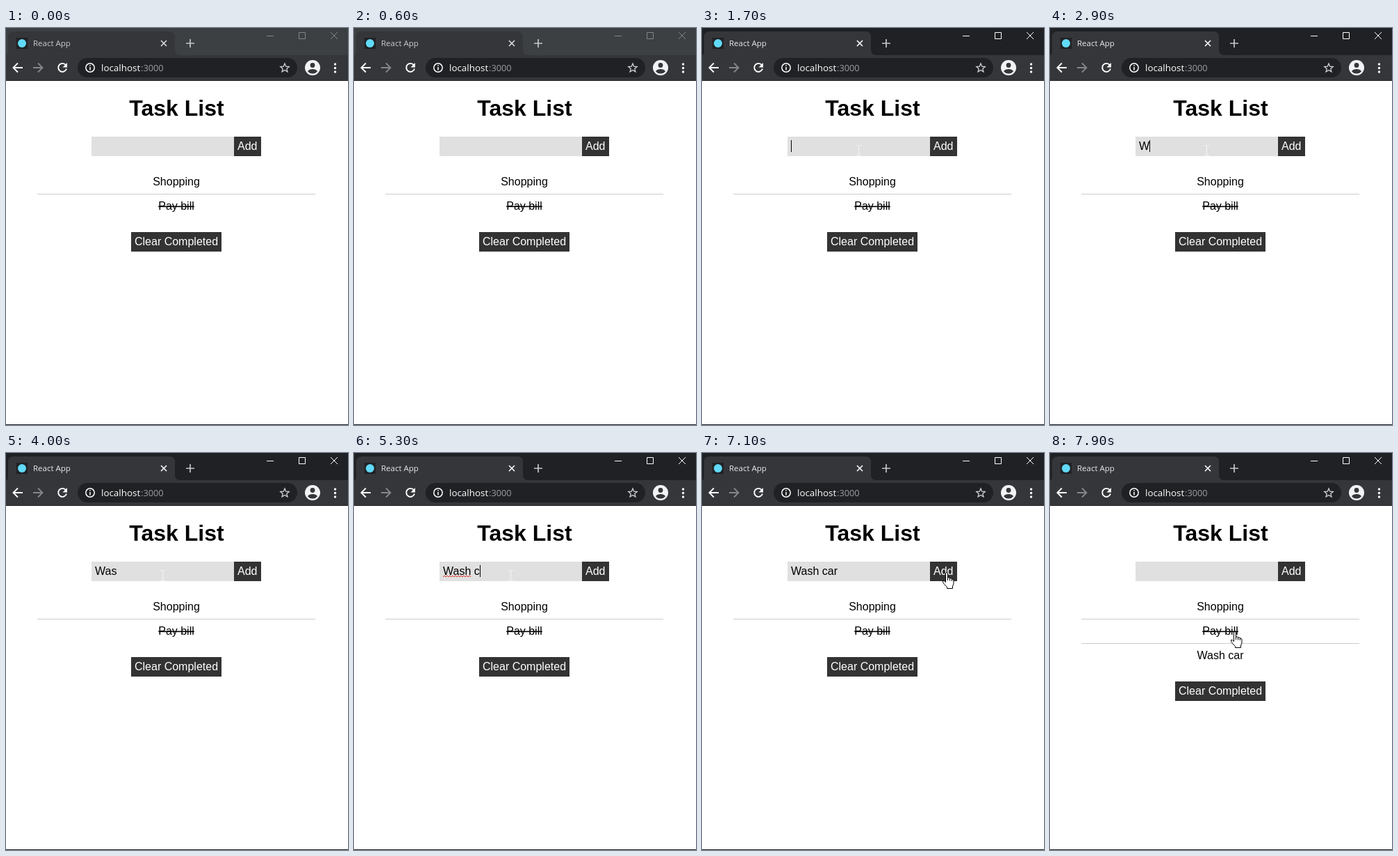
Recreate the animation shown at these times as an HTML page. Size 492x570 px, loop 8000 ms.

```html
<!DOCTYPE html>
<html lang="en">
<head>
<meta charset="utf-8">
<title>Task List</title>
<style>
html, body { margin: 0; width: 100%; height: 100%; overflow: hidden; background: #fff; }
svg { display: block; width: 492px; height: 570px; }
text { font: 16px "Liberation Sans", Arial, sans-serif; white-space: pre; }
.mid { text-anchor: middle; }
.ui { font-family: "Open Sans", "Noto Sans", sans-serif; }
.line { fill: none; stroke-width: 1; }
.icon { fill: none; stroke: #fff; stroke-width: 1.9; }
</style>
</head>
<body>
<svg viewBox="0 0 492 570">
  <rect id="strip" width="492" height="40"/>
  <path fill="#35363a" d="M0 39Q3 39 3 34V13Q3 5 11 5H235Q243 5 243 13V31Q243 39 251 39H492V76H0Z"/>
  <path class="line" stroke="#292a2d" d="M0 75.5H492"/>
  <rect x="15" y="14" width="16" height="16" fill="#202124"/>
  <circle cx="23" cy="22" r="6" fill="#61dafb"/>
  <g id="tab">
    <text class="ui" x="39" y="26" style="font-size:11.5px" fill="#e8eaed">React App</text>
    <path class="icon" style="stroke-width:1.6" d="M223 18L231 26M231 18L223 26"/>
  </g>
  <path class="icon" style="stroke:#c4c6c9;stroke-width:1.7" d="M259 22H271M265 16V28"/>
  <path id="controls" class="line" d="M375 11.5H385M421.5 6.5H430.5V15.5H421.5ZM467 6L477 16M477 6L467 16"/>

  <path class="icon" d="M24 57H11M17 50.5L10.5 57L17 63.5"/>
  <path class="icon" style="stroke:#85868a" d="M39 57H52M46 50.5L52.5 57L46 63.5"/>
  <path class="icon" d="M86 53.2A6 6 0 1 0 87 58.5"/>
  <path fill="#fff" d="M88 50V56.5H81.5Z"/>
  <rect x="103" y="43" width="316" height="28" rx="14" fill="#202124"/>
  <circle class="icon" style="stroke-width:1.5" cx="121" cy="57" r="6.2"/>
  <path class="icon" style="stroke-width:1.5" d="M121 53V54.6M121 56V60.6"/>
  <text class="ui" x="137" y="62" style="font-size:13.4px" fill="#fff">localhost</text>
  <text class="ui" x="194" y="62" style="font-size:12.8px" fill="#9aa0a6">:3000</text>
  <path class="icon" style="stroke:#d0d2d5;stroke-width:1.3" d="M401 51L402.7 55.2L407.2 55.5L403.8 58.4L404.9 62.8L401 60.4L397.1 62.8L398.2 58.4L394.8 55.5L399.3 55.2Z"/>
  <circle cx="441" cy="57" r="11" fill="#f1f3f4"/>
  <circle cx="441" cy="53.5" r="3.4" fill="#35363a"/>
  <path fill="#35363a" d="M434 62Q436 59 441 59T448 62Q445.500 65.500 441 65.500T434 62Z"/>
  <g fill="#fff"><circle cx="473.500" cy="52" r="1.700"/><circle cx="473.500" cy="57.500" r="1.700"/><circle cx="473.500" cy="63" r="1.700"/></g>

  <text class="mid" x="245.500" y="126" style="font-size:32px;font-weight:bold">Task List</text>
  <rect x="123" y="156" width="205" height="28" fill="#e0e0e0"/>
  <rect x="328" y="156" width="39" height="28" fill="#333"/>
  <text x="333" y="175" fill="#fff">Add</text>
  <text id="entry" x="128" y="175"></text>
  <path id="wave" class="line" stroke="#e03030"/>
  <rect id="caret" y="161" width="1" height="17"/>
  <text class="mid" x="245" y="226">Shopping</text>
  <rect x="45" y="238" width="400" height="1" fill="#ccc"/>
  <text class="mid" x="245" y="261" text-decoration="line-through">Pay bill</text>
  <g id="added">
    <rect x="45" y="273" width="400" height="1" fill="#ccc"/>
    <text class="mid" x="245" y="296">Wash car</text>
  </g>
  <g id="clear">
    <rect x="180" y="293" width="130" height="28" fill="#333"/>
    <text class="mid" x="245" y="312" fill="#fff">Clear Completed</text>
  </g>
  <rect y="569" width="492" height="1" fill="#1c1c1c"/>

  <g id="pointer">
    <path id="arrow" fill="#fff" stroke="#000" d="M.5 .5V16.500L4.200 13L6.700 18.500L9 17.500L6.600 12.200H11.800Z"/>
    <g id="hand" transform="translate(-6.500)">
      <path fill="#fff" stroke="#000" d="M5 2Q5 .5 6.500 .5T8 2V8Q10.500 7 11 9Q13.500 8 13.800 10Q16.500 9.500 16.500 12V16Q16.500 18 15 20V23.500H7V21.500L3 17.500Q.2 13.500 1 12.500Q2.500 11.500 5 14.500Z"/>
      <path class="line" stroke="#000" d="M8 8V12M11 9V12.500M13.800 10V13"/>
    </g>
    <path id="beam" class="line" stroke="#f6f6f6" d="M-3 -7.500H-1L.5 -6.500L2 -7.500H4M.5 -6.500V6.500M-3 7.500H-1L.5 6.500L2 7.500H4"/>
  </g>
</svg>
<script>
const LOOP = 8000, STEP = 100, FOCUS = 1500, SUBMIT = 7200;
const $ = id => document.getElementById(id);
const show = (id, on) => $(id).setAttribute("visibility", on ? "visible" : "hidden");
const word = "Wash car";
const keyTimes = [2800, 3050, 3300, 4400, 4700, 5000, 5700, 6150];
// time, x, y of the pointer's hot spot
const path = [
  [700, 300, 486], [900, 290, 390], [1100, 270, 298], [1200, 269, 295],
  [1300, 262, 270], [1500, 225, 176], [6600, 225, 176], [7000, 352, 172],
  [7100, 352, 171], [7200, 352, 171], [7500, 220, 312], [7600, 205, 322],
  [7800, 258, 268], [7900, 266, 256]
];

function place(t) {
  const i = path.findIndex(p => p[0] >= t);
  if (i < 1) return path[i < 0 ? path.length - 1 : 0].slice(1);
  const [t0, x0, y0] = path[i - 1], [t1, x1, y1] = path[i];
  const k = (t - t0) / (t1 - t0);
  return [x0 + (x1 - x0) * k, y0 + (y1 - y0) * k];
}

function pointerKind(x, y, shift) {
  const within = (l, t, r, b) => x >= l && x < r && y >= t && y < b;
  if (within(123, 156, 328, 184)) return "beam";
  const clickable = within(328, 156, 367, 184) || within(45, 203, 445, 274 + shift) ||
    within(180, 293 + shift, 310, 321 + shift);
  return clickable ? "hand" : "arrow";
}

function draw(t) {
  const active = t >= FOCUS, done = t >= SUBMIT, shift = done ? 35 : 0;
  $("strip").setAttribute("fill", active ? "#202124" : "#3c4043");
  $("controls").setAttribute("stroke", active ? "#fff" : "#85878a");
  $("tab").setAttribute("opacity", active ? 1 : .83);

  const typed = keyTimes.filter(k => k <= t);
  const lastKey = typed.length ? typed[typed.length - 1] : FOCUS;
  $("entry").textContent = done ? "" : word.slice(0, typed.length);
  const width = typed.length && !done ? $("entry").getComputedTextLength() : 0;
  $("caret").setAttribute("x", Math.round(128 + width));
  show("caret", active && !done && (t - lastKey) % 1000 < 500);
  show("wave", t >= 4900 && t < 5700);
  show("added", done);
  $("clear").setAttribute("transform", `translate(0 ${shift})`);

  const [x, y] = place(t).map(Math.round), kind = pointerKind(x, y, shift);
  $("pointer").setAttribute("transform", `translate(${x} ${y})`);
  for (const id of ["arrow", "hand", "beam"]) show(id, id === kind && t >= path[0][0]);
}

$("wave").setAttribute("d", "M128 178" + "l2-2l2 2".repeat(10));
const start = performance.now();
function tick() {
  const t = (performance.now() - start) % LOOP;
  draw(Math.floor(t / STEP) * STEP);
  requestAnimationFrame(tick);
}
tick();
</script>
</body>
</html>
```
